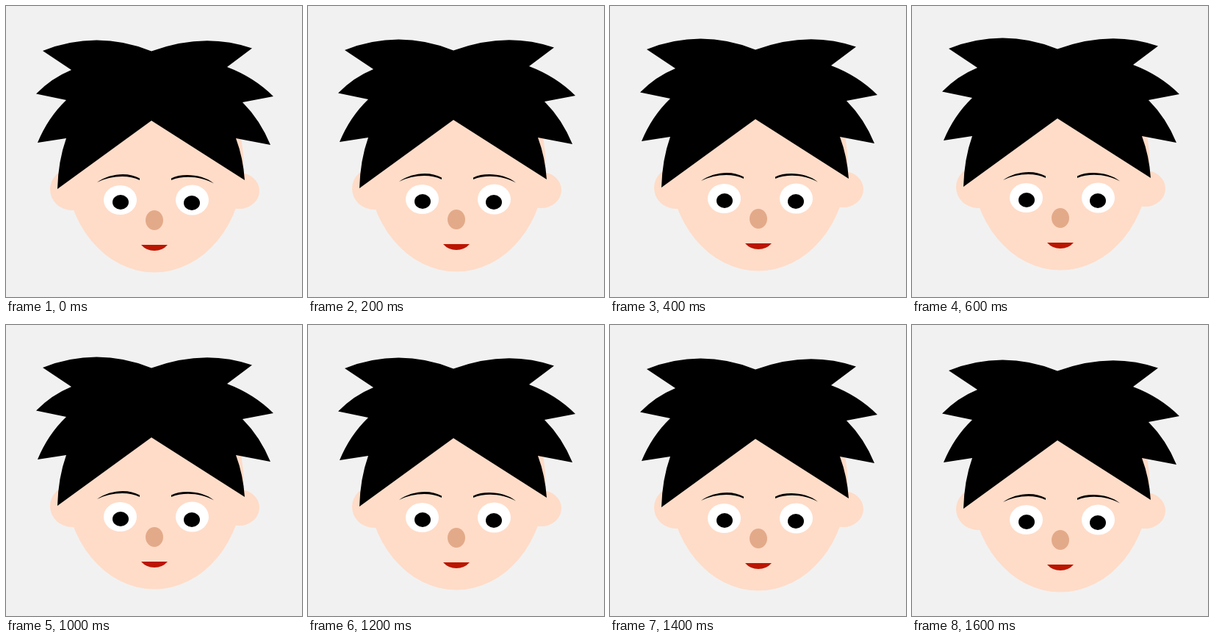
Animation, 403 px wide and 396 px high, one loop 1.8 s. Source, as an HTML page:

```html
<!DOCTYPE html>
<html lang="en">
<head>
<meta charset="utf-8">
<title>Bobbing head</title>
<style>
  html, body { margin: 0; width: 100%; height: 100%; overflow: hidden; background: #f1f1f1; }
  svg { display: block; width: 403px; height: 396px; }
</style>
</head>
<body>
<svg viewBox="0 0 403 396">
  <rect width="403" height="396" fill="#f1f1f1"/>
  <g id="head">
    <g fill="#ffdcc8">
      <ellipse cx="90" cy="249.5" rx="30" ry="28.5"/>
      <ellipse cx="317.5" cy="251.5" rx="27.5" ry="24.5"/>
      <ellipse cx="202" cy="215" rx="121.5" ry="147.5"/>
    </g>
    <path id="hair" d="M50 61 Q124 32 198 61.5 Q270 35 335 57.5 L301 83
      Q338 97 364 123 L322 131 Q346 155 360 189 L313 180 Q323 207 325 237
      L198 156 L70 249 Q71 211 82 180 L43 186 Q57 152 82 128
      L41 119.5 Q62 98 89 87 Z"/>
    <path d="M124 240 C140 228 166 225 182 234.5 V237 C166 229 142 231 124 240 Z"/>
    <path d="M225 234.5 C240 227 268 229 283 241.5 C266 232 242 230 225 237 Z"/>
    <g fill="#fff">
      <ellipse cx="155.5" cy="264" rx="22.5" ry="20"/>
      <ellipse cx="253.5" cy="264" rx="22.5" ry="20.5"/>
    </g>
    <ellipse cx="156" cy="267" rx="11" ry="10"/>
    <ellipse cx="253" cy="268" rx="11" ry="10"/>
    <ellipse cx="202" cy="291.5" rx="12" ry="13.5" fill="#e3aa89"/>
    <path d="M184 325 H220 Q213 333 202 333 Q191 333 184 325 Z" fill="#bb1500"/>
  </g>
</svg>
<script>
  const head = document.getElementById('head');
  const STEP = 200;
  const LOOP = 1800;
  const RISE = 4;
  const start = performance.now();

  // One pixel per step: up, back down, then a single dip below rest.
  function offset(step) {
    return step === 8 ? 1 : Math.abs(step - RISE) - RISE;
  }

  function draw(now) {
    const t = Math.max(0, now - start) % LOOP;
    head.setAttribute('transform', `translate(0 ${offset(Math.floor(t / STEP))})`);
    requestAnimationFrame(draw);
  }

  draw(start);
</script>
</body>
</html>
```
